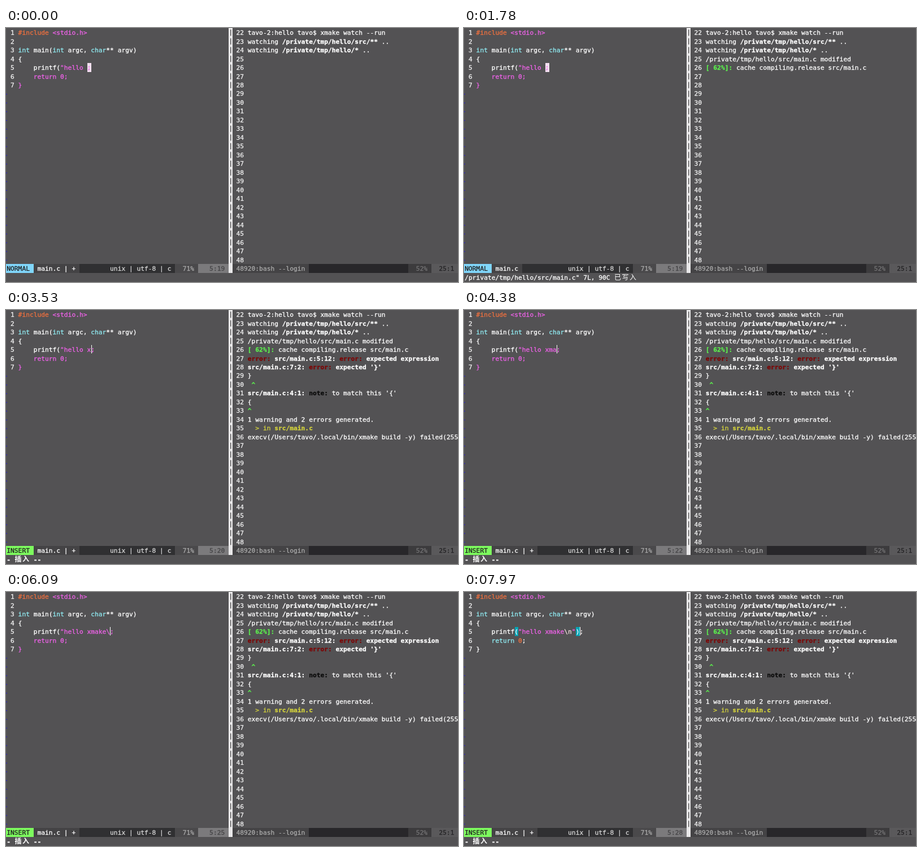
Animation, 800 px wide and 450 px high, one loop 8 s. Source, as an HTML page with a canvas:

```html
<!DOCTYPE html>
<html lang="en">
<head>
<meta charset="utf-8">
<title>Editor and build watcher</title>
<style>
html, body { margin: 0; width: 100%; height: 100%; overflow: hidden; background: #535254; }
canvas { display: block; width: 800px; height: 450px; }
</style>
</head>
<body>
<canvas id="stage" width="800" height="450"></canvas>
<script>
const ctx = document.getElementById('stage').getContext('2d');
const LOOP = 8000;
const CELL = 6.77, LEFT = 1.6, ROW = 15.48, TOP = 0.3;
const FONT = '11.25px "DejaVu Sans Mono", monospace';
const WIDE = '12px "Noto Sans CJK SC", "Noto Sans CJK", sans-serif';

// Lower-case keys are regular weight, upper-case keys are bold.
const INK = {
  w: '#ffffff', W: '#ffffff', n: '#f2f2f2', o: '#f0713f', m: '#ee62e8',
  c: '#90ebf2', s: '#f5dfe0', G: '#5cf04e', R: '#7d0505', K: '#0c0c0c',
  y: '#d2d13c', Y: '#d2d13c', k: '#202020', l: '#d6d6d6', g: '#aaaaaa',
  d: '#747375', b: '#242325', p: '#454446'
};

const KEYS = {
  command: 450, w: 760, save: 1300, insert: 3050, close: 6600, paren: 7400
};
const TYPED = [
  ['x', 3500], ['m', 3850], ['a', 4200], ['k', 4700], ['e', 5120],
  ['\\', 5720], ['n', 6160], ['"', KEYS.close], [')', KEYS.paren]
];

// Each entry: time of appearance, then style/text pairs.
const OUTPUT = [
  [0, 'w', 'tavo-2:hello tavo$ xmake watch --run'],
  [0, 'w', 'watching ', 'W', '/private/tmp/hello/src/**', 'w', ' ..'],
  [0, 'w', 'watching ', 'W', '/private/tmp/hello/*', 'w', ' ..'],
  [1480, 'w', '/private/tmp/hello/src/main.c modified'],
  [1720, 'G', '[ 62%]:', 'w', ' cache compiling.release src/main.c'],
  [2000, 'R', 'error:', 'W', ' src/main.c:5:12: ', 'R', 'error:', 'W', ' expected expression'],
  [2000, 'W', 'src/main.c:7:2: ', 'R', 'error:', 'W', " expected '}'"],
  [2000, 'w', '}'],
  [2000, 'G', ' ^'],
  [2000, 'W', 'src/main.c:4:1: ', 'K', 'note:', 'w', " to match this '{'"],
  [2000, 'w', '{'],
  [2000, 'G', '^'],
  [2000, 'w', '1 warning and 2 errors generated.'],
  [2000, 'y', '  > in ', 'Y', 'src/main.c'],
  [2000, 'w', 'execv(/Users/tavo/.local/bin/xmake build -y) failed(255']
];

const colX = col => LEFT + col * CELL;
const rowY = row => TOP + row * ROW;

// A hairline stroke gives the text the fuller weight of a smoothed terminal.
function put(col, row, ...runs) {
  ctx.lineWidth = 0.3;
  for (let i = 0; i < runs.length; i += 2) {
    const style = runs[i];
    const weight = style < 'a' ? 'bold ' : '';
    ctx.fillStyle = ctx.strokeStyle = INK[style];
    for (const ch of runs[i + 1]) {
      const wide = ch > '\u2e7f';
      const x = colX(col) + (wide ? 0.4 : -0.3);
      const y = rowY(row) + 11.8;
      ctx.font = weight + (wide ? WIDE : FONT);
      ctx.fillText(ch, x, y);
      if (!wide) ctx.strokeText(ch, x, y);
      col += wide ? 2 : 1;
    }
  }
}

function fill(col, end, row, color) {
  const x = col <= 0 ? 0 : Math.round(colX(col));
  const y = Math.round(rowY(row));
  ctx.fillStyle = color;
  ctx.fillRect(x, y, Math.round(colX(end)) - x, Math.round(rowY(row + 1)) - y);
}

function cell(col, row, color) {
  fill(col, col + 1, row, color);
}

function drawCode(t, mode, typed) {
  const closed = t >= KEYS.close;
  const pick = style => closed ? style : 'm';
  const end = 21 + typed.length;

  for (let i = 0; i < 7; i++) put(1, i, 'n', String(i + 1));
  ctx.fillStyle = '#2c22b8';
  for (let i = 7; i < 27; i++) ctx.fillRect(0, rowY(i) + 8, 2, 1.3);

  put(3, 0, 'o', '#include ', 'm', '<stdio.h>');
  put(3, 2, 'c', 'int', 'w', ' main(', 'c', 'int', 'w', ' argc, ', 'c', 'char', 'w', '** argv)');
  put(3, 3, 'w', '{');

  if (t >= KEYS.paren) {
    cell(13, 4, '#04a3b5');
    cell(29, 4, '#04a3b5');
  }
  if (mode === 'NORMAL') cell(21, 4, '#f2dfef');
  put(7, 4, 'w', 'printf(', 'm', '"hello ');
  put(21, 4, 'm', typed.slice(0, 5), closed ? 's' : 'm', typed.slice(5, 7),
    'm', typed.slice(7, 8), 'w', typed.slice(8), pick('w'), ';');
  if (mode === 'INSERT') {
    ctx.fillStyle = '#ffffff';
    ctx.fillRect(Math.round(colX(end)), Math.round(rowY(4)), 1, 15);
  }

  put(7, 5, pick('c'), 'return ', pick('o'), '0', pick('w'), ';');
  put(3, 6, pick('w'), '}');
}

function drawOutput(t) {
  ctx.fillStyle = '#e9e8e9';
  ctx.fillRect(394, 0, 7, Math.round(rowY(28)));
  ctx.fillStyle = '#4c4b4d';
  for (let i = 0; i < 27; i++) ctx.fillRect(397, rowY(i) + 2.5, 1.3, 11);
  for (let i = 0; i < 27; i++) put(60, i, 'n', String(22 + i));
  OUTPUT.forEach(([at, ...runs], i) => {
    if (t >= at) put(63, i, ...runs);
  });
}

function drawStatus(t, mode, typed) {
  const row = 27;
  const name = mode.length + 2;
  const dirty = t < KEYS.save || typed.length > 0;
  const file = dirty ? 'main.c | +' : 'main.c';

  fill(0, 58, row, '#303032');
  fill(0, name - 1, row, mode === 'INSERT' ? '#7dfb5e' : '#80d6fb');
  fill(name - 1, name + file.length + 1, row, '#444345');
  fill(44, 50, row, '#4a494b');
  fill(50, 58, row, '#7b7a7c');
  put(0, row, 'k', mode);
  put(name, row, 'w', file);
  put(27, row, 'l', 'unix | utf-8 | c');
  put(46, row, 'g', '71%');
  put(53, row, 'p', '5:' + (19 + typed.length));

  fill(59, 79, row, '#444345');
  fill(79, 105, row, '#28272a');
  fill(105, 111, row, '#3c3b3d');
  fill(111, 119, row, '#5a595b');
  put(60, row, 'g', '48920:bash --login');
  put(107, row, 'd', '52%');
  put(113, row, 'b', '25:1');
}

function drawMessage(t, mode) {
  const row = 28;
  if (mode === 'COMMAND') {
    const hasW = t >= KEYS.w;
    if (hasW) put(0, row, 'w', 'w');
    cell(hasW ? 1 : 0, row, '#dcdbdc');
  } else if (mode === 'INSERT') {
    put(-1, row, 'W', '-- 插入 --');
  } else if (t >= KEYS.save) {
    put(-1, row, 'w', '"/private/tmp/hello/src/main.c" 7L, 90C 已写入');
  }
}

function modeAt(t) {
  if (t >= KEYS.insert) return 'INSERT';
  return t >= KEYS.command && t < KEYS.save ? 'COMMAND' : 'NORMAL';
}

function draw(t) {
  const mode = modeAt(t);
  const typed = TYPED.filter(([, at]) => t >= at).map(([ch]) => ch).join('');
  ctx.fillStyle = '#535254';
  ctx.fillRect(0, 0, 800, 450);
  drawCode(t, mode, typed);
  drawOutput(t);
  drawStatus(t, mode, typed);
  drawMessage(t, mode);
}

function tick() {
  draw(performance.now() % LOOP);
  requestAnimationFrame(tick);
}
tick();
</script>
</body>
</html>
```
